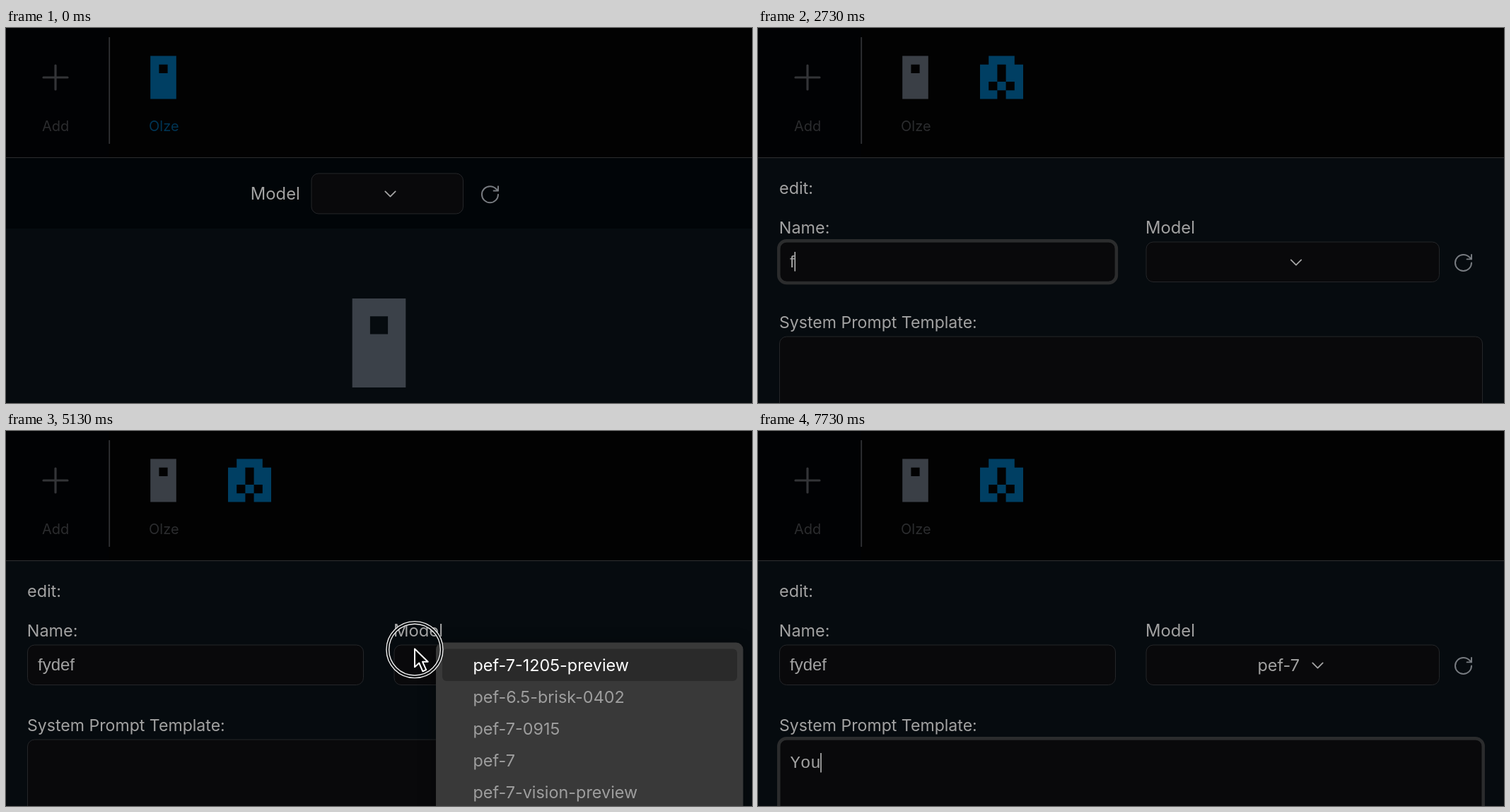
Animation of 1055 by 531 pixels, one loop 8 s. Source, as an HTML page:

```html
<!DOCTYPE html>
<html lang="en">
<head>
<meta charset="utf-8">
<title>Bot editor</title>
<style>
  html, body { margin: 0; width: 100%; height: 100%; overflow: hidden; background: #000; }
  svg { display: block; width: 100vw; height: 100vh; }
  text { font: 23.4px Inter, sans-serif; fill: #a2a2a2; white-space: pre; }
  .tile { font-size: 20px; }
  .wide { font-size: 23.8px; }
  .arial { font: 24px "Liberation Sans", Arial, sans-serif; }
  .mono { font: 24px "Liberation Mono", "Courier New", monospace; }
  .box { fill: #09090b; stroke: #252629; }
  .focus { fill: none; stroke: #2b2c2d; stroke-width: 4.5; }
  .glow { fill: none; stroke: #38587f; stroke-width: 2; }
  .line { fill: none; stroke-linecap: round; stroke-linejoin: round; }
  .chev { stroke: #a5a5a5; stroke-width: 1.8; }
  .reload { stroke: #777b80; stroke-width: 1.55; }
</style>
</head>
<body>
<svg viewBox="0 0 1055 531" preserveAspectRatio="none">
  <defs>
    <path id="chev" class="line chev" d="M-7.2-3.6 0 3.6 7.2-3.6"/>
    <g id="reload" class="line reload" transform="scale(1.28) translate(-12 -12)">
      <path d="M21 12a9 9 0 1 1-9-9c2.52 0 4.93 1 6.74 2.74L21 8M21 3v5h-5"/>
    </g>
  </defs>

  <rect width="1055" height="531" fill="#060b0f"/>
  <rect width="1055" height="183" fill="#020202"/>
  <rect width="146" height="183" fill="#010204"/>
  <rect y="183" width="1055" height="1.2" fill="#2a2b2c"/>

  <g id="add">
    <rect id="card" x="16" y="16" width="108" height="145.5" rx="10" fill="#26282b"/>
    <path id="plus" class="line" d="M70 53V87M53 70H87" stroke-width="3.2"/>
    <text id="addText" class="tile" x="51" y="146">Add</text>
    <rect id="addGlow" class="glow" x="12" y="12" width="116" height="153.5" rx="14"/>
  </g>
  <rect x="145.3" y="13" width="1.8" height="151" fill="#303134"/>
  <path id="oldIcon"/>
  <text id="oldText" class="tile" x="202" y="146">Olze</text>

  <g id="chat">
    <rect y="184.2" width="1055" height="99.8" fill="#010508"/>
    <text class="wide" x="345.8" y="243">Model</text>
    <rect class="box" x="432" y="206" width="214.5" height="57" rx="10"/>
    <use href="#chev" x="543.5" y="235"/>
    <use href="#reload" x="684.5" y="235.7"/>
    <path id="bigIcon" fill="#3b4149"/>
  </g>

  <g id="form">
    <path id="newIcon" fill="#003f63"/>
    <rect id="newGlow" class="glow" x="286.5" y="12" width="116" height="153.5" rx="14"/>
    <text x="30" y="235">edit:</text>
    <text x="29.8" y="291">Name:</text>
    <text class="wide" x="548" y="291">Model</text>
    <text x="30" y="425" style="font-size:23.1px">System Prompt Template:</text>
    <rect class="box" x="30.5" y="303" width="475" height="56.5" rx="10"/>
    <rect id="nameFocus" class="focus" x="29.3" y="301.3" width="477.6" height="59.6" rx="11"/>
    <text id="name" class="arial" x="45" y="339"></text>
    <rect class="box" x="549" y="303" width="414.5" height="56.5" rx="10"/>
    <rect id="modelGlow" class="glow" x="545" y="298" width="423" height="66" rx="13"/>
    <text id="model" x="706.5" y="340">pef-7</text>
    <use id="modelChev" href="#chev" y="332"/>
    <use href="#reload" x="997.5" y="332.5"/>
    <rect class="box" x="30.5" y="437" width="994" height="130" rx="10"/>
    <rect id="promptFocus" class="focus" x="29.3" y="435.3" width="996.4" height="140" rx="11"/>
    <text id="prompt" class="mono" x="45.5" y="477"></text>
    <rect id="caret" width="1.6" height="27.5" fill="#b4b4b4"/>
  </g>

  <g id="menu">
    <rect x="608" y="299.5" width="434.5" height="260" rx="10" fill="#393939" style="filter:drop-shadow(0 4px 12px #0006)"/>
    <rect id="pick" x="617" width="417" height="45.5" rx="6" fill="#2a2a2a"/>
  </g>

  <g id="ring" fill="none">
    <circle stroke="#05080a" stroke-width="4.5"/>
    <circle stroke="#eee" stroke-width="1.4"/>
    <circle stroke="#eee" stroke-width="1.4"/>
  </g>
  <g id="arrow">
    <path d="M1 1.500V27.200L7.200 21.500 12.400 33.300 17.200 31.200 12 19.700H19.700Z" fill="#000" stroke="#fff" stroke-width="2" stroke-linejoin="round"/>
  </g>
  <g id="hand">
    <path d="M-.5 3.5C-2 .3 2.3-1.8 4 1.4L8 10C10 8.600 12 9 13 10.600 15 9.700 17 11 17.300 13 18.800 14 18.300 17 17.300 20L15 28.500H4.500C3 25-1 22-3 18.500L-6.500 15.500C-7 12-3.500 11.700-1 14L3 16.500Z" fill="#fff" stroke="#000" stroke-width="1.4" stroke-linejoin="round"/>
    <path d="M5.500 16V23.500M9.300 16V23.500M13 16V23.500" stroke="#111" stroke-width="1.4"/>
  </g>
  <g id="beam" class="line">
    <path stroke="#fff" stroke-width="5.2"/>
    <path stroke="#000" stroke-width="1.8"/>
  </g>
</svg>

<script>
const $ = id => document.getElementById(id);
const show = (id, on) => $(id).setAttribute('display', on ? 'inline' : 'none');
const set = (el, attrs) => { for (const k in attrs) el.setAttribute(k, attrs[k]); };
const between = (t, a, b) => t >= a && t < b;

const LOOP = 8000, TICK = 1000 / 15;
const OLD = ['.###.', '.#.#.', '.###.', '.###.', '.###.'];
const NEW = ['.###.', '##.##', '##.##', '#.#.#', '##.##'];
const MODELS = ['pef-7-1205-preview', 'pef-6.5-brisk-0402', 'pef-7-0915', 'pef-7', 'pef-7-vision-preview'];
const BLUE = '#003f63', GREY = '#3a3f46', DIM = '#2b2c2e';
const CLICKS = [1200, 2000, 5060, 5800, 6260];
const NAME = 'fydef', NAME_KEYS = [2530, 3130, 3460, 3660, 4130];
const PROMPT = 'You', PROMPT_KEYS = [7195, 7530, 7660];

const inOut = p => p * p * (3 - 2 * p);
const out = p => 1 - (1 - p) ** 3;
const soft = p => 1 - (1 - p) ** 2;

// Pointer legs: start, end, from, to, easing
const MOVES = [
  [140, 866, 668, 429, 72, 109, inOut],
  [1400, 2000, 72, 109, 170, 319, inOut],
  [4400, 4800, 170, 319, 537, 301, soft],
  [4800, 5060, 537, 301, 577, 307, out],
  [5400, 5800, 577, 307, 690, 461, inOut],
  [5930, 6130, 690, 461, 677, 457, inOut],
  [6130, 6260, 677, 457, 664, 462, out]
];

function pixels(rows, x, y, size) {
  let d = '';
  rows.forEach((row, j) => [...row].forEach((c, i) => {
    if (c === '#') d += `M${x + i * size} ${y + j * size}h${size}v${size}h${-size}z`;
  }));
  return d;
}

function pointer(t) {
  let pos = [MOVES[0][2], MOVES[0][3]];
  for (const [a, b, x0, y0, x1, y1, ease] of MOVES) {
    if (t < a) break;
    const p = ease(Math.min(1, (t - a) / (b - a)));
    pos = [x0 + (x1 - x0) * p, y0 + (y1 - y0) * p];
  }
  return pos;
}

function cursorKind(t, x, y, editing, menu) {
  if (!between(t, 195, 2530) && !between(t, 4460, 7195)) return '';
  if (between(x, 16, 124) && between(y, 16, 162)) return 'hand';
  if (!editing || menu) return 'arrow';
  const inName = between(x, 30, 506) && between(y, 303, 360);
  const inPrompt = between(x, 30, 1024) && y > 437;
  return inName || inPrompt ? 'beam' : 'arrow';
}

const typed = (text, keys, t) => text.slice(0, keys.filter(k => t >= k).length);

function render(ms) {
  const t = Math.floor((ms + 5) / TICK) * TICK;
  const [x, y] = pointer(t);
  const editing = t >= 1330;
  const menu = between(t, 5120, 5930);
  const chosen = t >= 5930;
  const kind = cursorKind(t, x, y, editing, menu);

  const hover = kind === 'hand';
  show('card', hover);
  $('plus').setAttribute('stroke', hover ? '#6b7280' : '#333437');
  $('addText').style.fill = hover ? '#6b7280' : DIM;
  show('addGlow', between(t, 1260, 1330));
  $('oldIcon').setAttribute('fill', editing ? GREY : BLUE);
  $('oldText').style.fill = editing ? DIM : '#003453';

  show('chat', !editing);
  show('form', editing);
  show('newGlow', between(t, 1330, 2060));
  show('nameFocus', between(t, 2060, 5060));
  show('modelGlow', between(t, 5930, 6330));
  show('promptFocus', t >= 6330);
  show('model', chosen);
  $('modelChev').setAttribute('x', chosen ? 791.5 : 761);

  const name = $('name'), prompt = $('prompt');
  name.textContent = typed(NAME, NAME_KEYS, t);
  prompt.textContent = typed(PROMPT, PROMPT_KEYS, t);
  const inPrompt = t >= 6330;
  const field = inPrompt ? prompt : name;
  const width = field.textContent ? field.getComputedTextLength() : 0;
  set($('caret'), { x: (inPrompt ? 45 : 44.8) + Math.max(width, 1), y: inPrompt ? 456 : 317 });
  show('caret', between(t, 2060, 4660) || between(t, 6330, 6530) || t >= 6995);

  show('menu', menu);
  const row = x > 617 ? Math.max(0, Math.min(4, Math.floor((y - 308) / 45))) : 0;
  $('pick').setAttribute('y', 308.5 + row * 45);
  items.forEach((item, i) => item.style.fill = i === row ? '#fff' : '#9e9e9e');

  const click = CLICKS.find(c => between(t, c, c + 130));
  show('ring', click !== undefined);
  if (click !== undefined) {
    const r = 57 - 17 * Math.min(1, (t - click) / 67);
    const radii = [r - 1.8, r, r - 3.6];
    [...$('ring').children].forEach((c, i) => set(c, { cx: x + 1, cy: y + 2.6, r: radii[i] }));
  }
  for (const id of ['arrow', 'hand', 'beam']) {
    show(id, id === kind);
    $(id).setAttribute('transform', `translate(${x} ${y})`);
  }
}

$('oldIcon').setAttribute('d', pixels(OLD, 192, 39.5, 12.2));
$('newIcon').setAttribute('d', pixels(NEW, 314, 39.5, 12.2));
$('bigIcon').setAttribute('d', pixels(OLD, 464.5, 383, 25.2));
for (const p of $('beam').children) {
  p.setAttribute('d', 'M-5.500-14Q0-13.500 0-9V9Q0 13.500-5.500 14M5.500-14Q0-13.500 0-9M5.500 14Q0 13.500 0 9M-3 1H3');
}
const items = MODELS.map((label, i) => {
  const item = document.createElementNS($('menu').namespaceURI, 'text');
  set(item, { x: 660.5, y: 340 + i * 45 });
  item.textContent = label;
  return $('menu').appendChild(item);
});

function frame() {
  render(performance.now() % LOOP);
  requestAnimationFrame(frame);
}
frame();
</script>
</body>
</html>
```
